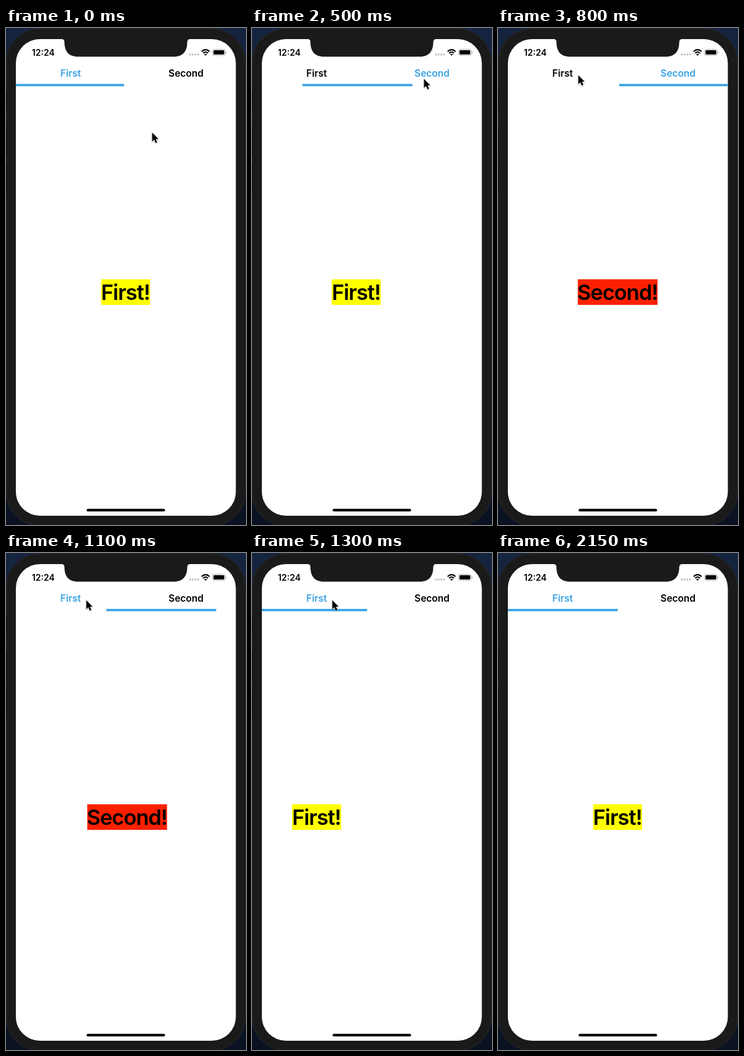
An HTML page for the animation above (2.25 s loop, 390 by 806 pixels).

```html
<!DOCTYPE html>
<html lang="en">
<head>
<meta charset="utf-8">
<title>Tab switch</title>
<style>
  html, body { margin: 0; width: 100%; height: 100%; overflow: hidden; background: #0d1729; }
  svg { display: block; width: 390px; height: 806px; }
  text { font-family: Inter, "Open Sans", sans-serif; font-weight: 600; font-optical-sizing: none; text-anchor: middle; }
  .tab { font-size: 15.5px; }
  .title { font-size: 34.5px; letter-spacing: -1px; }
</style>
</head>
<body>
<svg viewBox="0 0 390 806">
  <defs>
    <linearGradient id="desk" x2="0" y2="1">
      <stop offset="0" stop-color="#15243f"/>
      <stop offset="1" stop-color="#0a1222"/>
    </linearGradient>
    <clipPath id="screen"><rect x="16" y="18" width="357.5" height="773" rx="39"/></clipPath>
    <filter id="soft" x="-50%" y="-50%" width="200%" height="200%">
      <feDropShadow dx="0" dy="1" stdDeviation="1" flood-opacity=".35"/>
    </filter>
  </defs>

  <rect width="390" height="806" fill="url(#desk)"/>
  <rect x="0" y="1" width="389.5" height="806" rx="55" fill="#1a1a1a" stroke="#2b2b2d"/>
  <path d="M.5 103v29M.5 160v48M.5 220v48" stroke="#0b0b0d"/>

  <g clip-path="url(#screen)">
    <rect x="16" y="18" width="358" height="773" fill="#fff"/>

    <g id="first">
      <rect x="154.5" y="407.5" width="79.7" height="41.5" fill="#fffe00"/>
      <text class="title" x="194.2" y="440.5">First!</text>
    </g>
    <g id="second">
      <rect x="129.7" y="407.5" width="129.6" height="41.5" fill="#fd2000"/>
      <text class="title" x="194.2" y="440.5">Second!</text>
    </g>

    <text class="tab" id="tab0" x="105" y="79">First</text>
    <text class="tab" id="tab1" x="292.5" y="79">Second</text>
    <rect id="bar" y="90.7" width="178.5" height="3.7" fill="#38a2e4"/>

    <path d="M90 17.5H299V18C296 18 294.5 20 294.5 23C294.500 38 287 46.500 273 46.500H117C102 46.500 95 38 95 23C95 20 93.500 18 90 18Z" fill="#1a1a1a"/>
    <text x="60.500" y="44.500" font-size="14">12:24</text>

    <g fill="#c3c3c3">
      <circle cx="299" cy="43" r="1.700"/><circle cx="303.300" cy="43" r="1.700"/>
      <circle cx="307.600" cy="43" r="1.700"/><circle cx="311.900" cy="43" r="1.700"/>
    </g>
    <g fill="none" stroke="#000" stroke-width="2">
      <path d="M317.800 38.200Q324.300 32 330.800 38.200M320.200 40.900Q324.300 37 328.400 40.900"/>
      <path d="M322 42.700Q324.300 40.700 326.600 42.700L324.300 45Z" fill="#000" stroke="none"/>
    </g>
    <rect x="335.700" y="34.600" width="20.400" height="10" rx="2.800" fill="none" stroke="#a3a3a3" stroke-width=".9"/>
    <rect x="337.200" y="36.100" width="17.400" height="7" rx="1.500"/>
    <path d="M357.200 38V41.400Q358.500 40.900 358.500 39.700T357.200 38Z" fill="#a3a3a3"/>
    <rect x="131" y="779.700" width="127.500" height="4.400" rx="2.200"/>
  </g>

  <path id="cursor" d="M0 0V14.500L3.300 11.500L5.700 16.900L8.200 15.800L5.900 10.600H10.300Z" fill="#000" stroke="#fff" stroke-width="1" paint-order="stroke" filter="url(#soft)"/>
</svg>
<script>
const LOOP = 2250, STEP = 50, PAGE = 357, TAB = 178.5;
const el = id => document.getElementById(id);

// Tab changes: start time and tab moved to
const moves = [[-400, 0], [400, 1], [1050, 0]];

// Underline progress after a tap, with its overshoot
const swing = [[0, 0], [50, .176], [100, .37], [150, .62], [200, .86], [250, 1.0425],
  [300, 1.06], [350, 1.035], [400, 1.014], [450, 1.006], [500, 1.002], [550, 1]];

// Pointer path: time, x, y
const path = [[0, 237, 169], [100, 242, 158], [250, 270, 105], [350, 281, 82], [450, 281, 81],
  [500, 279, 82], [550, 258, 84], [600, 216, 84], [650, 168, 83], [700, 146, 80], [800, 130, 76]];

const clamp = v => Math.min(1, Math.max(0, v));

function track(keys, t) {
  const i = keys.findIndex(k => k[0] > t);
  if (i < 0) return keys[keys.length - 1].slice(1);
  if (i === 0) return keys[0].slice(1);
  const a = keys[i - 1], b = keys[i], u = (t - a[0]) / (b[0] - a[0]);
  return a.slice(1).map((v, n) => v + (b[n + 1] - v) * u);
}

function easeInOut(x) {
  const half = u => Math.pow(2 * u, 2.35) / 2;
  return x < .5 ? half(x) : 1 - half(1 - x);
}

function draw(t) {
  const [start, to] = moves.filter(m => m[0] < t).pop();
  const age = t - start;
  const between = p => to ? p : 1 - p;

  const page = between(easeInOut(clamp((age - 21) / 365)));
  el("first").setAttribute("transform", `translate(${-PAGE * page})`);
  el("second").setAttribute("transform", `translate(${PAGE * (1 - page)})`);

  el("bar").setAttribute("x", 16 + TAB * between(track(swing, age)[0]));
  for (const n of [0, 1]) el("tab" + n).setAttribute("fill", n === to ? "#38a2e4" : "#000");

  const [x, y] = track(path, t);
  el("cursor").setAttribute("transform", `translate(${x + .5} ${y + .5})`);
  el("cursor").setAttribute("visibility", t < 1450 ? "visible" : "hidden");
}

const begin = performance.now();
function tick() {
  const t = (performance.now() - begin) % LOOP;
  draw(Math.floor(t / STEP) * STEP);
  requestAnimationFrame(tick);
}
tick();
</script>
</body>
</html>
```
